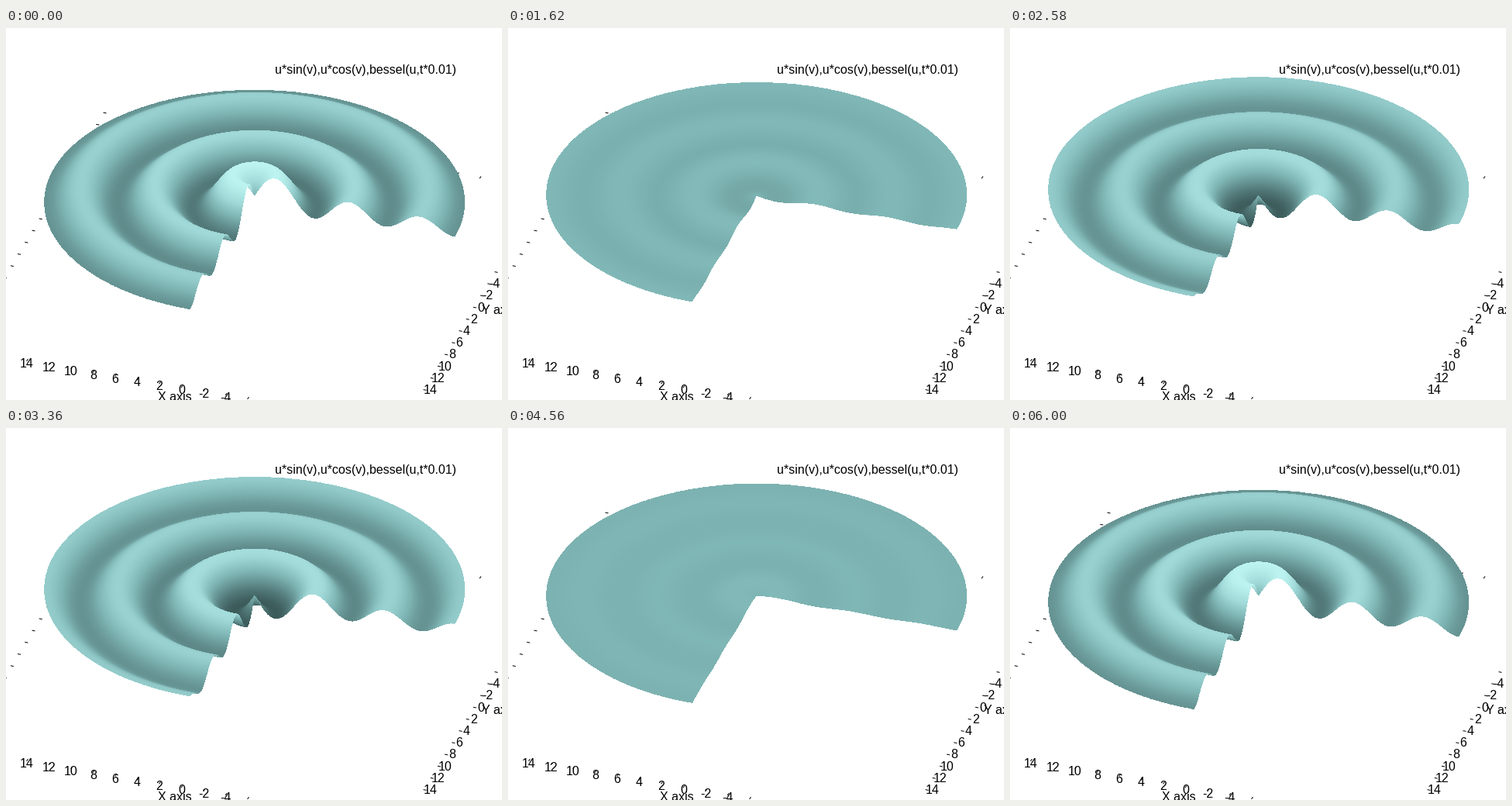
Write a matplotlib script that moves like this. It is 640 px wide and 480 px high and loops after 6.06 s.

```python
import numpy as np
import matplotlib.pyplot as plt
from matplotlib.animation import FuncAnimation

W, H, DPI = 640, 480, 80
FRAMES, STEP_MS = 101, 60

# Orthographic view of the ground plane
CX, CY = 320.7, 216.2
UNIT = 15.08                    # pixels per unit of u
RIM = 18.0
TILT = 0.533                    # vertical foreshortening
LIFT = 46.0                     # pixels per unit of height
TURN = np.radians(17.8)


def bessel1(x):
    tau = (np.arange(400) + 0.5) * np.pi / 400
    return np.cos(tau - np.outer(x, np.sin(tau))).mean(axis=1)


# Ground samples, ordered from back to front so nearer points overwrite
cols = np.arange(W)
gx = (cols + 0.5 - CX) / UNIT
gd = np.arange(-RIM, RIM, 0.4 / UNIT)
X, D = np.meshgrid(gx, gd)
radius = np.hypot(X, D)
along_right = X * np.cos(TURN) + D * np.sin(TURN)
along_left = D * np.cos(TURN) - X * np.sin(TURN)
keep = (radius <= RIM) & ~((along_right > 0) & (along_left > 0))

u_table = np.linspace(0, RIM, 1500)
wave = np.interp(radius[keep], u_table, bessel1(u_table))
base_y = CY + TILT * UNIT * D[keep]
pix_x = np.broadcast_to(cols, X.shape)[keep]

# Shade by height; entry 0 is transparent
LEVELS = 500
knots = [-0.6, -0.35, 0, 0.27, 0.6]
height = np.linspace(-0.6, 0.6, LEVELS)
shades = np.zeros((LEVELS + 1, 4), np.uint8)
shades[1:, 0] = np.interp(height, knots, [54, 82, 126, 160, 190])
shades[1:, 1] = np.interp(height, knots, [82, 120, 181, 217, 245])
shades[1:, 2] = np.interp(height, knots, [82, 120, 180, 216, 242])
shades[1:, 3] = 255


def surface(n):
    z = wave * np.cos(2 * np.pi * n / 100)
    rows = np.floor(base_y - LIFT * z).astype(int)
    level = ((z + 0.6) / 1.2 * (LEVELS - 1)).astype(int) + 1
    index = np.zeros(W * H, int)
    index[rows * W + pix_x] = level
    return shades[index].reshape(H, W, 4)


fig = plt.figure(figsize=(W / DPI, H / DPI), dpi=DPI, facecolor="white")
ax = fig.add_axes([0, 0, 1, 1])
ax.set_axis_off()


def label(x, y, text, ha="center"):
    ax.text(x, y, text, ha=ha, va="baseline", family="Liberation Sans",
            size=16 * 72 / DPI, color="black", zorder=5, clip_on=True)


def tick(x, y, dx, dy):
    ax.plot([x - dx, x + dx], [y - dy, y + dy], color="black",
            lw=72 / DPI, solid_capstyle="butt", zorder=1)


X_STEP = np.array([28.5, 4.9])
Y_STEP = np.array([-9.2, 15.2])
X_MARK = (-0.9, 1.4)
Y_MARK = (2.0, 0.4)

for i in range(11):
    x, y = np.array([27.5, 428.5]) + i * X_STEP
    tick(x, y, *X_MARK)
    if i < 10:
        label(x - 0.5, y + 9.5, str(14 - 2 * i))

for i in range(11):
    x, y = np.array([632.5, 315]) + i * Y_STEP
    tick(x, y, *Y_MARK)
    if i > 0:
        label(x + 7.5, y + 5, str(2 * i - 6))

corner = np.array([127.5, 109.5])
for i in range(15):
    tick(*(corner + i * Y_STEP), *Y_MARK)
for i in range(1, 18):
    tick(*(corner + i * X_STEP), *X_MARK)

label(347, 59, "u*sin(v),u*cos(v),bessel(u,t*0.01)", "left")
label(196.5, 481, "X axis", "left")
label(614, 369, "Y axis", "left")

sheet = ax.imshow(surface(0), extent=(0, W, H, 0), aspect="auto",
                  interpolation="nearest", zorder=3)
ax.set_xlim(0, W)
ax.set_ylim(H, 0)


def update(n):
    sheet.set_data(surface(n))
    return [sheet]


anim = FuncAnimation(fig, update, frames=FRAMES, interval=STEP_MS,
                     repeat=True, repeat_delay=0, blit=False)
plt.show()
```
